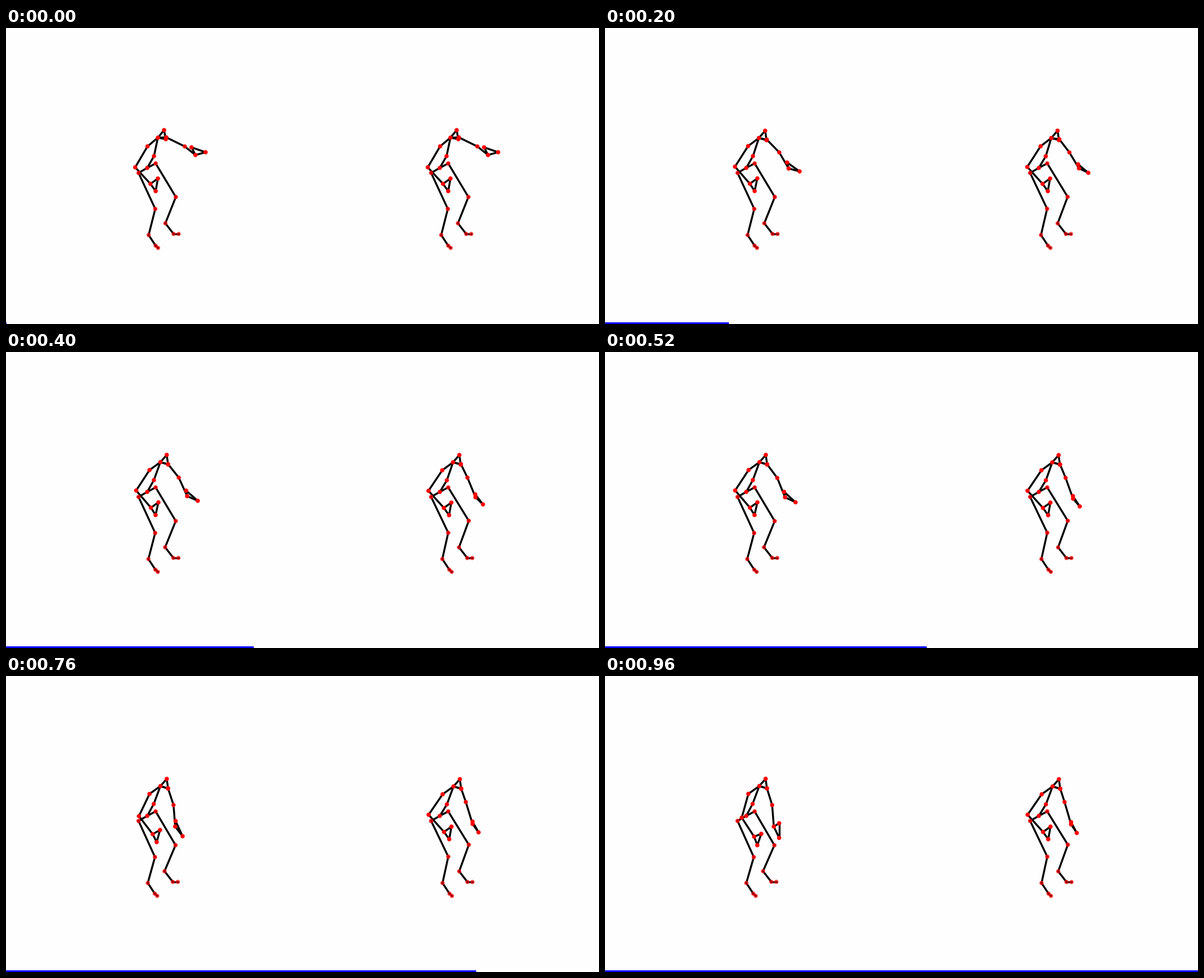
A matplotlib script that plays this animation: 1058 px wide and 529 px high, repeating every 1 s.

```python
import matplotlib.pyplot as plt
import numpy as np
from matplotlib.animation import FuncAnimation
from matplotlib.collections import LineCollection
from matplotlib.patches import Rectangle

W, H, DPI = 1058, 529, 100
FRAMES, INTERVAL = 25, 40
LAST = FRAMES - 1
ROOTS = (252 + 250j, 774 + 250j)

# joint: parent and the bone leading to it (x + y*j, in pixels)
REST = {
    "pelvis": (None, 0),
    "hip_l": ("pelvis", 15 - 8j),
    "knee_l": ("hip_l", 36 + 60j),
    "ankle_l": ("knee_l", -18.7 + 47j),
    "foot_l": ("ankle_l", 14.7 + 19j),
    "toe_l": ("foot_l", 9),
    "hip_r": ("pelvis", -15.5 + 9j),
    "knee_r": ("hip_r", 29.8 + 64.3j),
    "ankle_r": ("knee_r", -11.8 + 46.7j),
    "foot_r": ("ankle_r", 12.5 + 19j),
    "toe_r": ("foot_r", 4.3 + 4j),
    "spine": ("pelvis", 12 - 21j),
    "chest": ("spine", 7 - 33j),
    "neck": ("chest", 14 + 2.7j),
    "head": ("chest", 11 - 13.5j),
    "shoulder_l": ("chest", 15 - .5j),
    "elbow_l": ("shoulder_l", 33 + 16.2j),
    "wrist_l": ("elbow_l", 19 + 15.3j),
    "hand_l": ("wrist_l", 18 - 5j),
    "thumb_l": ("wrist_l", -7 - 13.7j),
    "shoulder_r": ("chest", -18.5 + 15.5j),
    "elbow_r": ("shoulder_r", -22 + 37.5j),
    "wrist_r": ("elbow_r", 27.2 + 29.5j),
    "hand_r": ("wrist_r", 9.3 + 13j),
    "thumb_r": ("wrist_r", 13.3 - 9.5j),
}
NAMES = list(REST)
LINKS = [(parent, name) for name, (parent, _) in REST.items() if parent]
LINKS += [("neck", "head"), ("hand_l", "thumb_l"), ("hand_r", "thumb_r")]
BONES = [(NAMES.index(a), NAMES.index(b)) for a, b in LINKS]

# Dots further from the viewer are fainter
FADE = {"pelvis": .93, "spine": .93, "hip": .78, "knee": .8, "ankle": .64,
        "foot": .62, "toe": .6, "elbow_l": .85}

# Bones the upper body settles into
LEAN = {"chest": 12 - 32j, "neck": 13.6 + 4.4j, "head": 11.3 - 12.9j,
        "shoulder_l": 13.6 + 4.1j, "shoulder_r": -19.5 + 14j}

# Left figure: settle into one pose, then swing to another between two times
SETTLE_A = {**LEAN,
            "elbow_l": 17.8 + 24.2j, "wrist_l": 14 + 35j,
            "hand_l": 18.5 + 9.5j, "thumb_l": -1.5 - 9.5j,
            "elbow_r": -24 + 36.5j, "wrist_r": 26.3 + 30.8j,
            "hand_r": 8.2 + 13.2j}
SWING_A = {
    "elbow_l": (9.3 + 29.9j, 12, 20), "wrist_l": (3 + 38.5j, 12, 19),
    "hand_l": (9.5 + 20.2j, 14, 22), "thumb_l": (9.5 - 6j, 17, 24),
    "elbow_r": (-11.5 + 42.6j, 14, 25), "wrist_r": (22 + 34.1j, 14, 25),
    "hand_r": (5.6 + 15.3j, 14, 25), "thumb_r": (12.7 - 5j, 14, 25),
}

# Right figure: settles only
SETTLE_B = {**LEAN,
            "elbow_l": 7.3 + 23.8j, "wrist_l": 11.3 + 40.5j,
            "hand_l": 9.8 + 15.5j, "thumb_l": -4j,
            "elbow_r": -25.1 + 36.5j, "wrist_r": 27.5 + 30.8j}

# Share of the body sway taken by each kind of bone
SWAY = {"knee": 1, "ankle": 2.6, "spine": -2.5}


def kind(name):
    return name.split("_")[0]


def settle(t, tau):
    return 1 - np.exp(-t / tau)


def smooth(t, start, stop):
    u = np.clip((t - start) / (stop - start), 0, 1)
    return u * u * (3 - 2 * u)


def turn(a, b, p):
    """Rotate and scale bone a part of the way to bone b."""
    return a * (b / a) ** p


def pose(t, root, settled, tau, swings, sway):
    pts = {}
    for name, (parent, bone) in REST.items():
        if parent is None:
            pts[name] = root
            continue
        bone = bone * np.exp(1j * sway * SWAY.get(kind(name), 0))
        if name in settled:
            bone = turn(bone, settled[name], settle(t, tau))
        if name in swings:
            end, start, stop = swings[name]
            bone = turn(bone, end, smooth(t, start, stop))
        pts[name] = pts[parent] + bone
    z = np.array([pts[n] for n in NAMES])
    return np.column_stack([z.real, z.imag])


def poses(t):
    sway = .013
    return (pose(t, ROOTS[0], SETTLE_A, 4, SWING_A, sway * (t / LAST) ** 2),
            pose(t, ROOTS[1], SETTLE_B, 6, {}, -sway * settle(t, 6)))


fig = plt.figure(figsize=(W / DPI, H / DPI), dpi=DPI, facecolor="#fefefe")
ax = fig.add_axes([0, 0, 1, 1])
ax.set(xlim=(0, W), ylim=(H, 0))
ax.axis("off")

colors = [(1, 0, 0, FADE.get(n, FADE.get(kind(n), 1))) for n in NAMES]
figures = []
for pts in poses(0):
    bones = LineCollection([], colors="black", linewidths=2.5,
                           capstyle="projecting", zorder=2)
    ax.add_collection(bones)
    dots = ax.scatter(*pts.T, s=20, c=colors, zorder=3)
    figures.append((bones, dots))
bar = ax.add_patch(Rectangle((0, H - 2.8), 1, 2.8, color="blue", lw=0, zorder=4))


def update(frame):
    for (bones, dots), pts in zip(figures, poses(frame)):
        bones.set_segments([pts[[i, j]] for i, j in BONES])
        dots.set_offsets(pts)
    bar.set_width(W * frame / LAST + 1)
    return [bar] + [artist for pair in figures for artist in pair]


anim = FuncAnimation(fig, update, frames=FRAMES, interval=INTERVAL,
                     repeat=True, repeat_delay=0)
plt.show()
```
